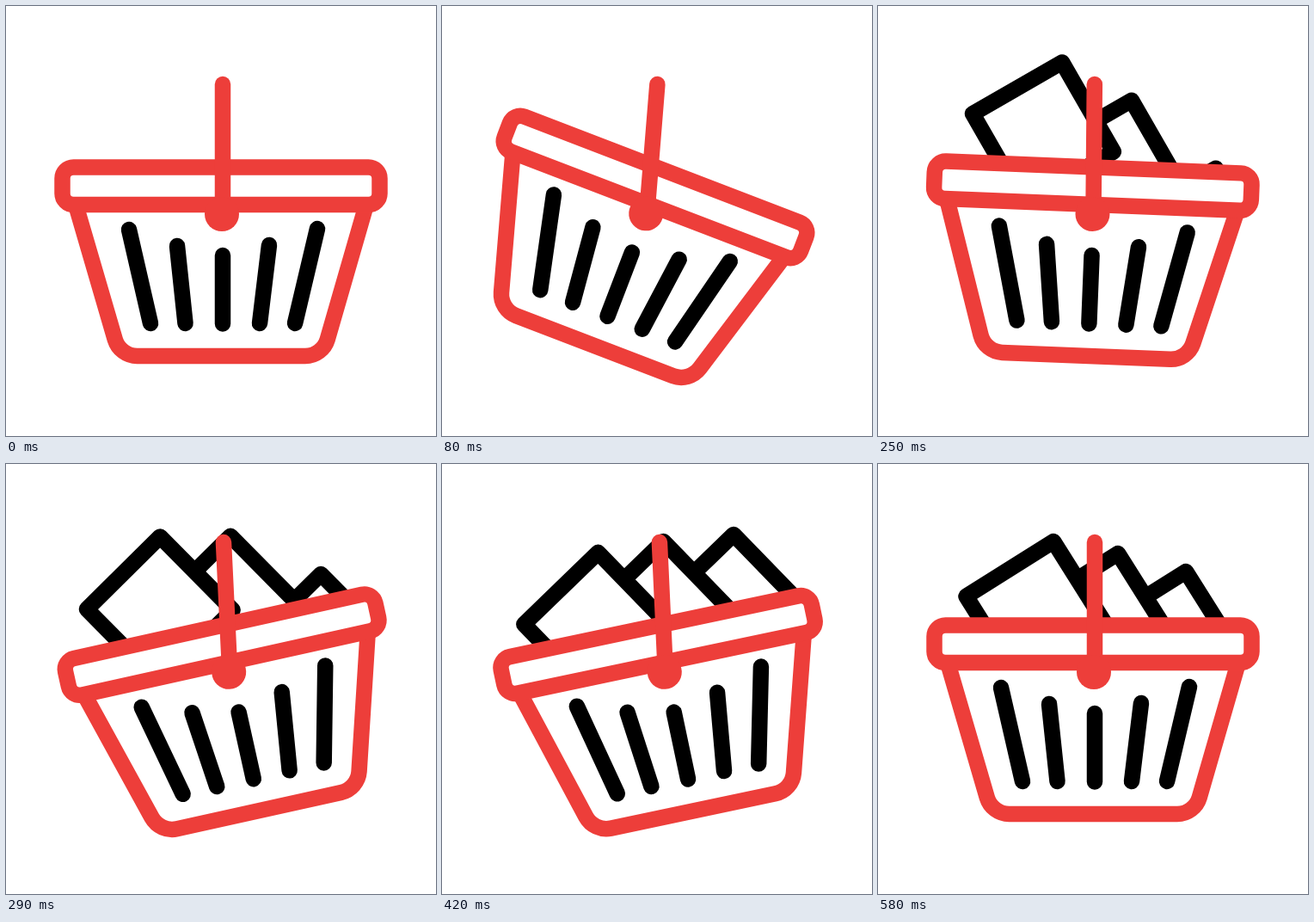
Write an HTML page that moves like this. It is 500 by 500 pixels and loops after 0.62 s.

```html
<!DOCTYPE html>
<html lang="en">
<head>
<meta charset="utf-8">
<title>Shopping basket</title>
<style>
  html, body { margin: 0; width: 100%; height: 100%; overflow: hidden; background: #fff; }
  svg { display: block; width: 100vw; height: 100vh; }
  .red { stroke: #ed3e3a; stroke-width: 18.5; fill: none; }
  .black { stroke: #000; stroke-width: 18.5; stroke-linecap: round; stroke-linejoin: round; fill: #fff; }
</style>
</head>
<body>
<svg viewBox="0 0 500 500">
  <defs>
    <clipPath id="aboveRim"><rect x="-200" y="-300" width="900" height="510"/></clipPath>
  </defs>
  <g id="swing">
    <g id="basket">
      <g id="boxes" class="black" clip-path="url(#aboveRim)"></g>
      <path class="red" d="M82.5 236L126.8 387.8A27 27 0 0 0 152.5 407H348A27 27 0 0 0 373.7 387.8L417.5 236"/>
      <rect class="red" x="65.5" y="187.5" width="369" height="43.5" rx="13" style="fill:#fff"/>
      <path class="black" d="M143 260L168 369M199 279L208.5 369M252 290V369.5M306 278L295 369M362 259L336 369"/>
    </g>
    <path class="red" stroke-linecap="round" d="M252 91V240"/>
    <circle cx="251" cy="242" r="20" fill="#ed3e3a"/>
  </g>
</svg>
<script>
const LOOP = 620;
const STARTS = [0, 40, 80, 130, 170, 210, 250, 290, 330, 380, 420, 460, 500, 540, 580];

// Basket tilt in degrees, one value per step
const TILT = [0, 8, 21, 25.5, 22.2, 13.8, 2.3, -12.5, -23.8, -20.1, -11.9, -3.7, 0, 0, 0];
const HANDLE_RATIO = 0.22;

// How far a box is from rest while it pops up, overshoots and settles
const POP = [[45, 100], [42, 85], [34, 58], [22, 29], [12, 4], [8, -16],
             [4.5, -23], [3, -19], [2, -11], [1, -3], [0, 0]];

// Top corner of each box at rest and its delay in steps, back to front
const BOXES = [
  { x: 358, y: 125, delay: 4 },
  { x: 279, y: 104, delay: 2 },
  { x: 204, y: 90, delay: 0, hiddenUntil: 3 }
];

const byId = id => document.getElementById(id);
const swing = byId("swing");
const basket = byId("basket");

for (const box of BOXES) {
  box.node = document.createElementNS("http://www.w3.org/2000/svg", "rect");
  const attrs = { x: -120, y: 0, width: 120, height: 120 };
  for (const key in attrs) box.node.setAttribute(key, attrs[key]);
  byId("boxes").append(box.node);
}

function popOffset(box, step) {
  if (step < (box.hiddenUntil || 0)) return POP[0];
  const phase = Math.max(0, Math.min(POP.length - 1, step - box.delay));
  return POP[phase];
}

function pose(step) {
  const tilt = TILT[step];
  const handle = tilt * HANDLE_RATIO;
  swing.setAttribute("transform", `rotate(${handle} 252 71)`);
  basket.setAttribute("transform", `rotate(${tilt - handle} 251 242)`);
  for (const box of BOXES) {
    const [dx, dy] = popOffset(box, step);
    box.node.setAttribute("transform", `translate(${box.x + dx} ${box.y + dy}) rotate(-32.2)`);
  }
}

const origin = performance.now();
function draw() {
  const time = Math.max(0, performance.now() - origin) % LOOP;
  pose(STARTS.findLastIndex(start => start <= time));
  requestAnimationFrame(draw);
}
draw();
</script>
</body>
</html>
```
